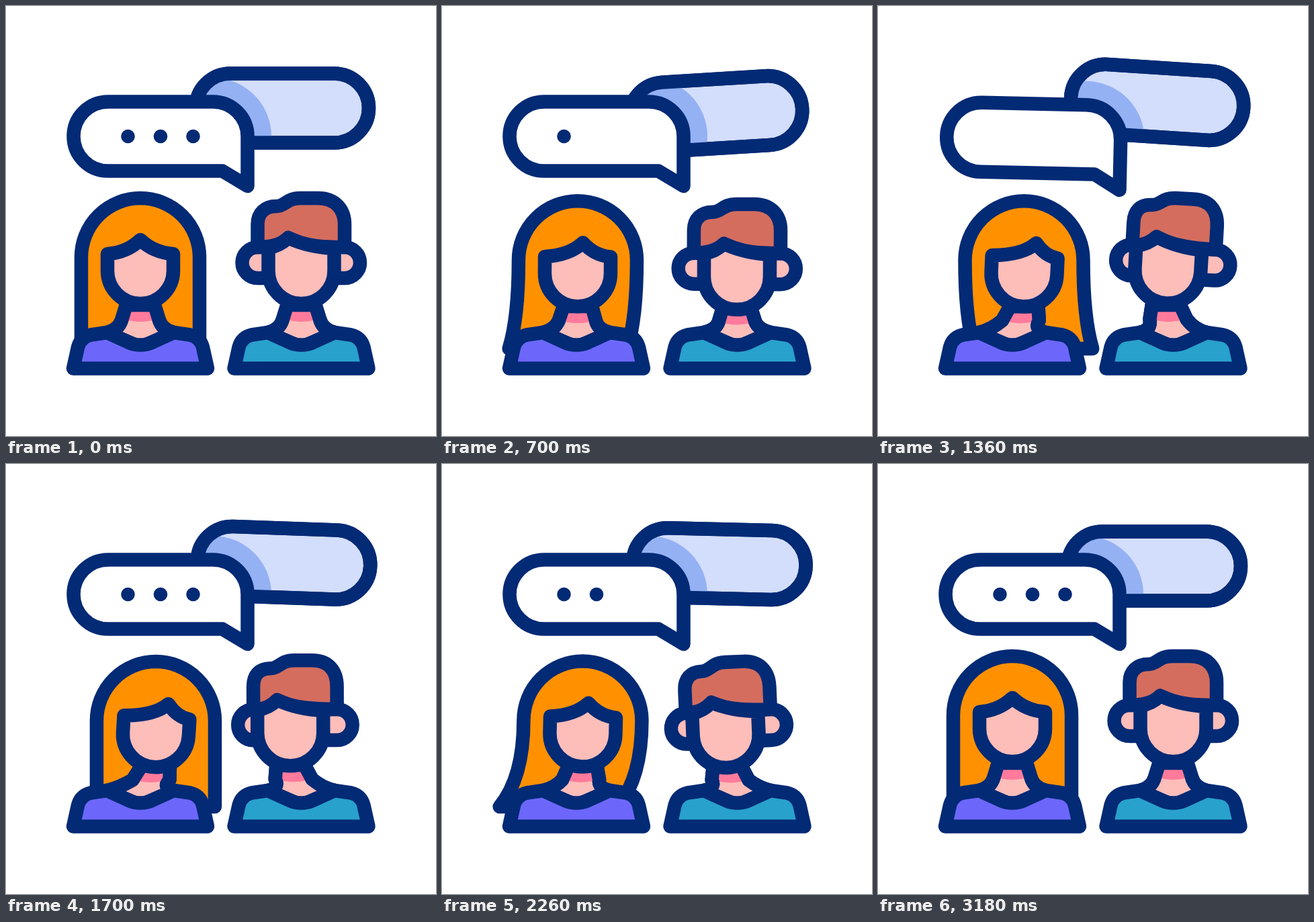
Recreate the animation shown at these times as an HTML page with a canvas. Size 640 px wide and 640 px high, loop 3.28 s.

```html
<!DOCTYPE html>
<html lang="en">
<head>
<meta charset="utf-8">
<style>
  html, body { margin: 0; width: 100%; height: 100%; overflow: hidden; background: #fff; }
  canvas { display: block; }
</style>
</head>
<body>
<canvas id="stage" width="640" height="640"></canvas>
<script>
const LOOP = 3280;
const NAVY = '#032a75', SKIN = '#fdbdb9', BLUSH = '#ff7a9b';
const ctx = document.getElementById('stage').getContext('2d');

const BACK_PATH = new Path2D('M334 100.5H488.5A51.5 51.5 0 0 1 488.5 203.5H334A51.5 51.5 0 0 1 334 100.5Z');
const FRONT_PATH = 'M152 142.5H308A51.5 51.5 0 0 1 359.5 194V268L322 245.5H152A51.5 51.5 0 0 1 152 142.5Z';
const BODY_PATH = 'M100 539.5L107 508Q111 493 126 489.5L150 486L183 501Q200 508 217 501L250 486L274 489.5Q289 493 293 508L300 539.5Z';

// Timing rules: part of a span, eased step, single swell, repeated dips.
const part = (t, a, b) => Math.min(1, Math.max(0, (t - a) / (b - a)));
const ramp = (t, a, b) => (1 - Math.cos(Math.PI * part(t, a, b))) / 2;
const swell = (t, a, b) => Math.sin(Math.PI * part(t, a, b));
const dips = (t, a, b, count) => Math.sin(Math.PI * count * part(t, a, b)) ** 2;

function group(draw) {
  ctx.save();
  draw();
  ctx.restore();
}

function turn(deg, x, y) {
  ctx.translate(x, y);
  ctx.rotate(deg * Math.PI / 180);
  ctx.translate(-x, -y);
}

function shape(path, fill) {
  const p = typeof path === 'string' ? new Path2D(path) : path;
  ctx.fillStyle = fill;
  ctx.fill(p);
  ctx.stroke(p);
}

function disc(x, y, r, fill) {
  ctx.fillStyle = fill;
  ctx.beginPath();
  ctx.arc(x, y, r, 0, 2 * Math.PI);
  ctx.fill();
}

function bubbles(t) {
  const talk = part(t, 220, 3180) * 4 % 1;      // four rounds of speech
  const u = part(talk, .03, .65);
  const wobble = -3.6 * Math.sin(2 * Math.PI * u) * Math.sin(Math.PI * u) * (1.6 - u);
  const sway = 3.8 * Math.sin(12 * Math.PI * part(t, 415, 2911));
  const frontTurn = () => turn(wobble, 95, 270);
  const backTurn = () => turn(sway, 545, 215);

  group(() => {
    const base = ctx.getTransform();
    backTurn();
    shape(BACK_PATH, '#d3ddfc');
    group(() => {
      ctx.clip(BACK_PATH);
      ctx.setTransform(base);
      frontTurn();
      disc(308, 194, 87, '#94b1f3');
    });
    ctx.stroke(BACK_PATH);
  });

  group(() => {
    frontTurn();
    shape(FRONT_PATH, '#fff');
    const step = Math.floor(7 * talk);
    for (let i = 0; i < 3; i++) {
      const hidden = step > i && step <= i + 3;
      if (!hidden) disc(181.5 + 48.5 * i, 194, 10.3, NAVY);
    }
  });
}

function torso(x, dy, color) {
  const y = dy / 2, mid = x * .7;
  const neck = new Path2D(`M150 486Q168 482 ${172.5 + mid} ${466 + y}L${179 + x} ${445 + y}
    H${221 + x}L${227.5 + mid} ${466 + y}Q232 482 250 486L200 508Z`);
  shape(neck, SKIN);
  group(() => {
    ctx.clip(neck);
    disc(200 + mid, 394 + y, 76, BLUSH);
  });
  ctx.stroke(neck);
  shape(BODY_PATH, color);
}

function woman(t) {
  const facing = ramp(t, 440, 980) - ramp(t, 2020, 2480);
  const drift = ramp(t, 900, 2000) - ramp(t, 2020, 2480);
  const x = 21 * facing + 12 * drift - 8 * ramp(t, 220, 440) + 4 * ramp(t, 2020, 2480) + 4 * ramp(t, 2520, 3180);
  const y = 7.5 * dips(t, 220, 2880, 7) + .014 * x * x;
  const tip = x - 22 * swell(t, 430, 780) + 15 * swell(t, 780, 1700) - 36 * swell(t, 1750, 2700);
  const l = 112 + x, r = 288 + x, top = 374 + y;
  shape(`M${112 + tip} 510Q${l} ${top + 85} ${l} ${top}A88 88 0 0 1 ${r} ${top}
    Q${r} ${top + 85} ${288 + tip} 510Z`, '#ff9100');
  torso(x, y, '#6c67fa');
  ctx.translate(x, y);
  turn(.15 * x, 200, 394);
  const p = 200 + 16 * facing;
  shape(`M151 369Q${p - 20} 367 ${p} 348Q${p + 20 - 6 * facing} 367 249 369
    V394A49 49 0 0 1 151 394Z`, SKIN);
}

function man(t) {
  const look = ramp(t, 600, 1200) - ramp(t, 2050, 2600);
  const lean = swell(t, 1540, 2500);
  const x = -17.5 * lean, y = 9 * dips(t, 580, 2920, 9);
  const tilt = 3.3 * look - 6.8 * lean, shift = -7.5 * look;
  ctx.translate(239.5, 0);
  torso(x + shift - tilt, y, '#28a1cc');
  ctx.translate(x, y);
  turn(tilt, 200, 382);
  const l = 135 + 2.5 * look, r = 264.5 - 2.5 * look, p = 180.5 + shift;
  shape(`M${l} 359H${r}A23 23 0 0 1 ${r} 405H${l}A23 23 0 0 1 ${l} 359Z`, SKIN);
  shape(`M${l} 359V325C${l} 308 146 298 163 298C176 298 178 286 198 286H225
    C250 286 ${r} 302 ${r} 325V359C235 359 ${p + 25} 358 ${p} 345C${p - 10} 355 155 359 ${l} 359Z`, '#d46d5e');
  shape(`M${151 + shift} 360Q${p - 12} 357 ${p} 345Q${p + 30} 359 ${249 + shift} 361
    V394A49 49 0 0 1 ${151 + shift} 394Z`, SKIN);
}

function draw(t) {
  ctx.fillStyle = '#fff';
  ctx.fillRect(0, 0, 640, 640);
  ctx.strokeStyle = NAVY;
  ctx.lineWidth = 20.5;
  ctx.lineJoin = ctx.lineCap = 'round';
  bubbles(t);
  group(() => woman(t));
  group(() => man(t));
}

const start = performance.now();
function tick() {
  draw((performance.now() - start) % LOOP);
  requestAnimationFrame(tick);
}
tick();
</script>
</body>
</html>
```
